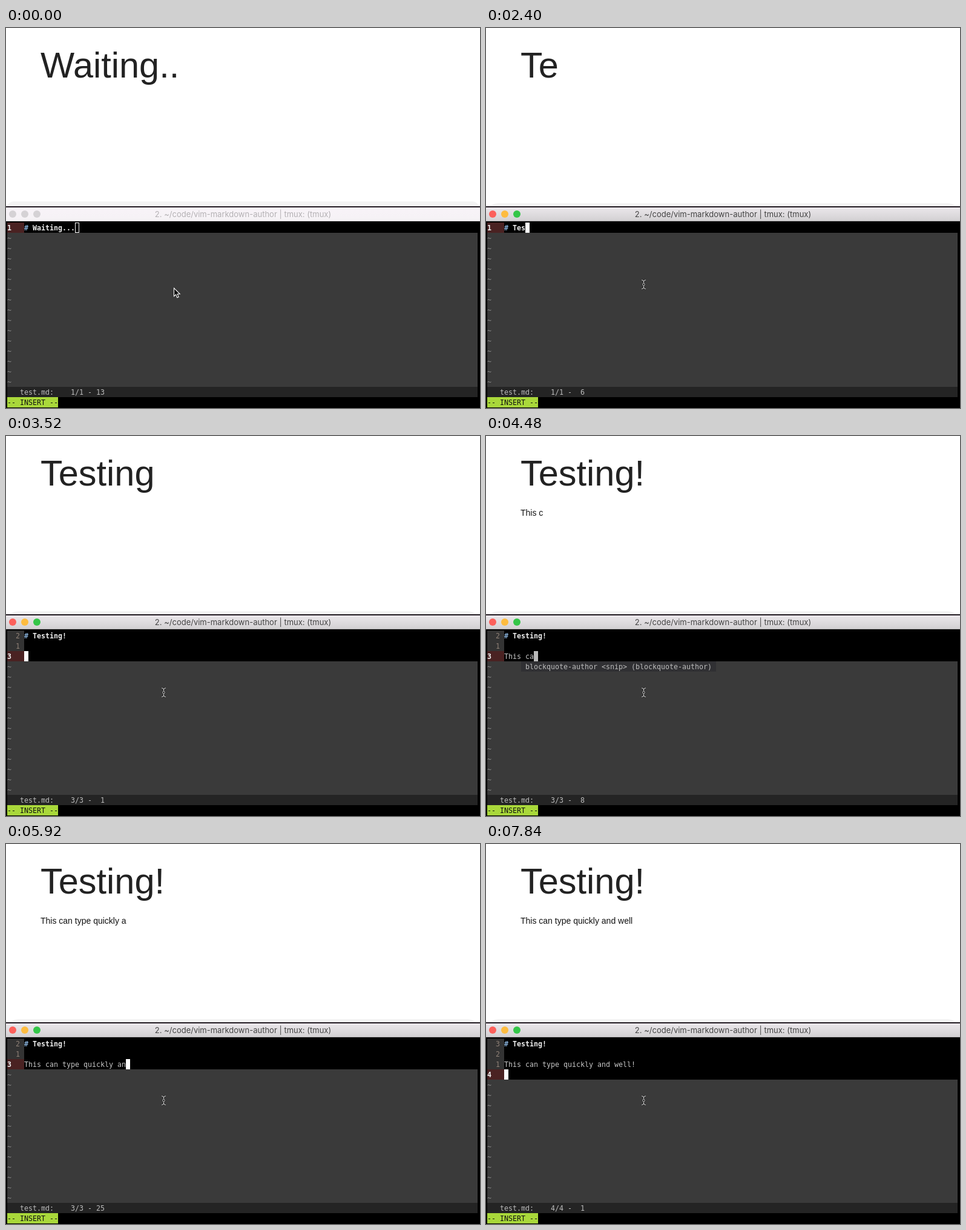
An HTML page with a canvas for the animation above (8000 ms loop, 783 by 629 pixels).

```html
<!DOCTYPE html>
<html lang="en">
<head>
<meta charset="utf-8">
<title>Live Markdown preview</title>
<style>
  html, body { margin: 0; width: 100%; height: 100%; overflow: hidden; background: #fff; }
  canvas { display: block; }
</style>
</head>
<body>
<canvas id="stage" width="783" height="629"></canvas>
<script>
const ctx = document.getElementById('stage').getContext('2d');
const LOOP = 8000, STEP = 160;
const CELL = 7, ROW = 17, TOP = 322, LEFT = 2, GUTTER = 4, ROWS = 16;
const MONO = '11.63px "DejaVu Sans Mono", monospace';
const SANS = '"Liberation Sans", Arial, sans-serif';
const TITLE = 'Testing!';
const SENTENCE = 'This can type quickly and well!';

// [time, characters typed so far]; the first part runs at two keys per step
const sentenceKeys = [
  ...Array.from({ length: 8 }, (_, i) => [4160 + i * STEP, 3 + 2 * i]),
  [5440, 19], [5600, 21], [5760, 22], [5920, 24], [6080, 26],
  [6400, 27], [6560, 29], [6720, 30], [7520, 31]
];
const snippets = { 'ca': 'blockquote-author', 'qui': 'blockquote-link' };

function typedAt(keys, t) {
  let count = 0;
  for (const [time, n] of keys) if (t >= time) count = n;
  return count;
}

// Everything the editor and its preview show at time t
function stateAt(t) {
  const s = { lines: ['# Waiting...'], col: 13, insert: true, cursor: 'block',
              heading: 'Waiting..', body: '' };
  if (t < 160) s.cursor = 'outline';
  if (t >= 1280) {
    s.heading = 'Waiting...';
    s.insert = false;
    if (t < 1440) s.cursor = 'none';
    else s.col = t < 1600 ? 12 : 3;
  }
  if (t >= 1760) {
    const n = t < 2240 ? 0 : Math.min(8, 2 + Math.floor((t - 2240) / STEP));
    s.insert = true;
    s.lines = ['# ' + TITLE.slice(0, n)];
    s.col = 3 + n;
    if (n) s.heading = TITLE.slice(0, t < 3840 ? n - 1 : n);
  }
  if (t >= 3360) { s.lines.push(''); s.col = 1; }
  if (t >= 3520) {
    const n = typedAt(sentenceKeys, t);
    const text = SENTENCE.slice(0, n);
    s.lines.push(text);
    s.col = n + 1;
    s.body = text.slice(0, -1);
    const word = text.split(' ').pop();
    if (snippets[word]) {
      s.popup = { name: snippets[word], col: n - word.length };
      s.cursor = 'dim';
    }
  }
  if (t >= 7840) { s.lines.push(''); s.col = 1; }
  return s;
}

function box(x, y, w, h, color) {
  ctx.fillStyle = color;
  ctx.fillRect(x, y, w, h);
}

function label(text, x, y, color, font) {
  ctx.font = font;
  ctx.fillStyle = color;
  ctx.fillText(text, x, y);
}

const columnX = col => LEFT + col * CELL;
const rowY = row => TOP + row * ROW;

function mono(text, col, row, color, bold) {
  label(text, columnX(col), rowY(row) + 13, color, (bold ? 'bold ' : '') + MONO);
}

function drawPreview(s) {
  box(0, 0, 783, 629, '#fff');
  label(s.heading, 57, 82, '#222', '59.5px ' + SANS);
  label(s.body, 57, 132, '#111', '14px ' + SANS);
}

function drawWindow(active) {
  ctx.fillStyle = '#f3f3f3';
  ctx.beginPath();
  ctx.roundRect(0, active ? 290 : 287, 783, 20, active ? [40, 40, 0, 0] : [14, 14, 0, 0]);
  ctx.fill();
  box(0, 295, 783, 334, '#000');
  box(0, 295, 783, 2, '#221b22');
  const bar = ctx.createLinearGradient(0, 297, 0, 319);
  bar.addColorStop(0, active ? '#ebe7eb' : '#f8f3f8');
  bar.addColorStop(1, active ? '#d3d1d3' : '#f5f2f5');
  box(0, 297, 783, 22, bar);
  box(0, 319, 783, 1, active ? '#b0aeb0' : '#d8d6d8');
  const lights = active ? ['#fc605b', '#fdbc40', '#34c648'] : ['#d5d2d5', '#d5d2d5', '#d5d2d5'];
  lights.forEach((color, i) => {
    ctx.fillStyle = color;
    ctx.beginPath();
    ctx.arc(11 + 20 * i, 308, 6, 0, 7);
    ctx.fill();
  });
  ctx.textAlign = 'center';
  label('2. ~/code/vim-markdown-author | tmux: (tmux)', 391.5, 313,
        active ? '#444' : '#b4b1b4', '13px Inter, sans-serif');
  ctx.textAlign = 'left';
}

function drawEditor(s) {
  const last = s.lines.length - 1;
  s.lines.forEach((text, row) => {
    const current = row === last;
    box(LEFT, rowY(row), GUTTER * CELL, ROW, current ? '#4a2222' : '#333');
    if (current) mono(String(row + 1), 0, row, '#f0f0f0', true);
    else mono(String(last - row), 2, row, '#8f8076');
    if (row === 0) {
      mono('#', GUTTER, row, '#87afd7', true);
      mono(text.slice(2), GUTTER + 2, row, '#eee', true);
    } else {
      mono(text, GUTTER, row, '#c6c6c6');
    }
  });

  const used = s.lines.length;
  box(LEFT, rowY(used), 777, (ROWS - used) * ROW, '#3a3a3a');
  for (let row = used; row < ROWS; row++) mono('~', 0, row, '#8a8a8a');

  drawCursor(s, last);
  if (s.popup) {
    const { name, col } = s.popup;
    const entry = ` ${name} <snip> (${name}) `;
    const start = GUTTER + col - 1;
    box(columnX(start), rowY(used), entry.length * CELL, ROW, '#303033');
    mono(entry, start, used, '#bcbcbc');
  }

  box(LEFT, rowY(ROWS), 777, ROW, '#242424');
  const position = `${used}/${used} - ${String(s.col).padStart(2)}`;
  mono('test.md:    ' + position, 3, ROWS, '#bcbcbc');
  if (s.insert) {
    box(LEFT, rowY(ROWS + 1), 12 * CELL, ROW, '#a9d83a');
    mono('-- INSERT --', 0, ROWS + 1, '#111');
  } else {
    mono('"test.md" 1L, 13C written', 0, ROWS + 1, '#c6c6c6');
  }
}

function drawCursor(s, row) {
  const col = GUTTER + s.col - 1, x = columnX(col), y = rowY(row);
  if (s.cursor === 'none') return;
  if (s.cursor === 'outline') {
    ctx.strokeStyle = '#fff';
    ctx.lineWidth = 1;
    ctx.strokeRect(x + .5, y + .5, CELL - 1, ROW - 1);
    return;
  }
  box(x, y, CELL, ROW, s.cursor === 'dim' ? '#bbb' : '#fff');
  const under = s.lines[row][s.col - 1];
  if (under) mono(under, col, row, '#000', true);
}

function drawArrow(x, y) {
  const path = new Path2D('M.5 .5V14L3.6 11.2L5.8 16.2L8.2 15.2L6 10.3H10.2Z');
  ctx.save();
  ctx.translate(x, y);
  ctx.fillStyle = '#000';
  ctx.strokeStyle = '#fff';
  ctx.lineWidth = 1.1;
  ctx.fill(path);
  ctx.stroke(path);
  ctx.restore();
}

function drawBeam(x, y) {
  const path = new Path2D('M-3.5 -7.5Q0 -7.5 0 -4.5Q0 -7.5 3.5 -7.5M-3.5 7.5Q0 7.5 0 4.5Q0 7.5 3.5 7.5' +
                          'M0 -5V-3L-2 0L0 3V5M0 -3L2 0L0 3');
  ctx.save();
  ctx.translate(x + .5, y + .5);
  for (const [color, width] of [['#222', 2.6], ['#ddd', 1]]) {
    ctx.strokeStyle = color;
    ctx.lineWidth = width;
    ctx.stroke(path);
  }
  ctx.restore();
}

function frame(now) {
  const t = now % LOOP;
  const s = stateAt(t);
  drawPreview(s);
  drawWindow(t >= 160);
  drawEditor(s);
  if (t < 160) drawArrow(277, 430);
  else if (t < 480) drawBeam(246, 413);
  else drawBeam(260, 424);
  requestAnimationFrame(frame);
}
requestAnimationFrame(frame);
</script>
</body>
</html>
```
